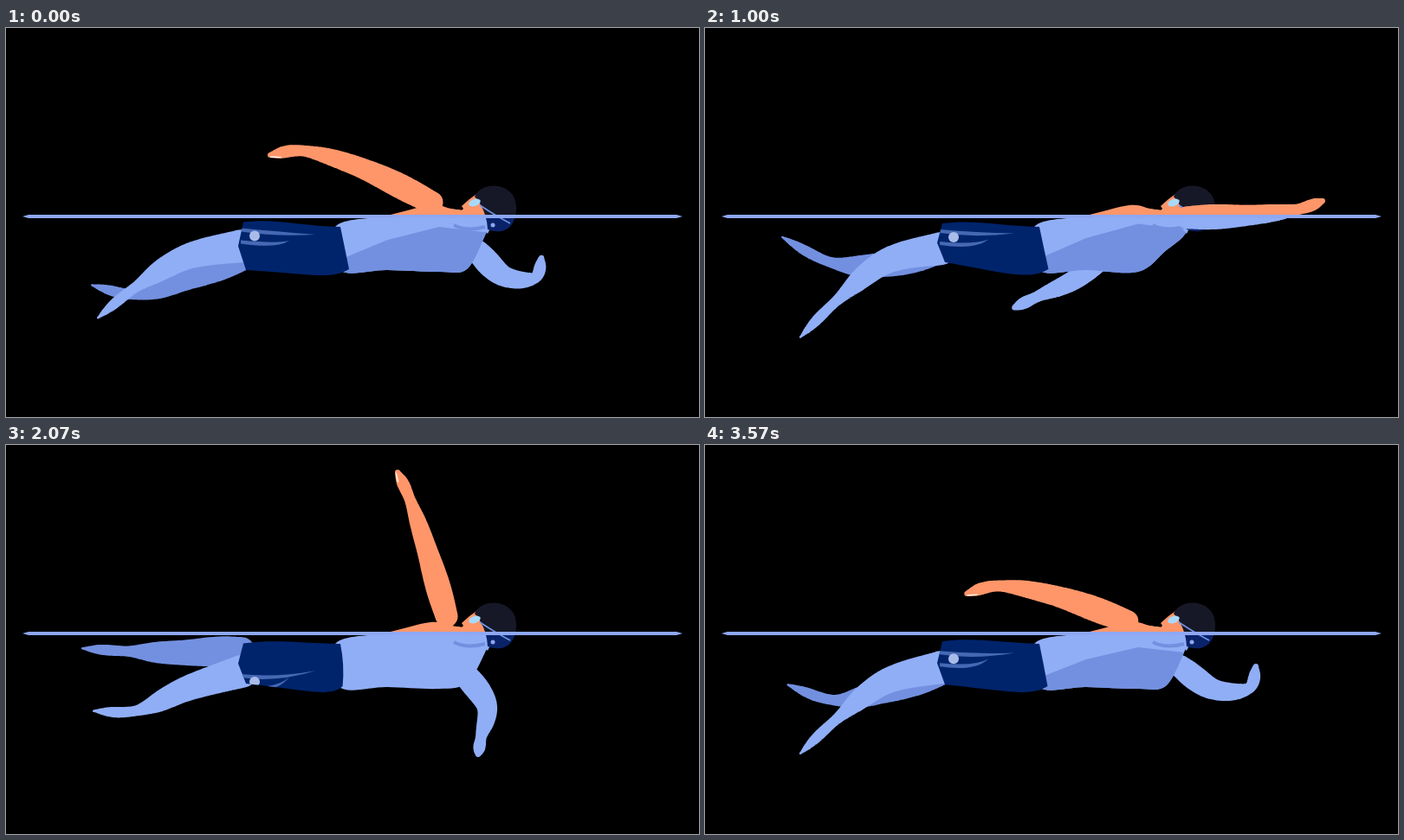
These frames come from a looping animation (800 px wide and 450 px high, 3.64 s). An HTML page with a canvas:

```html
<!DOCTYPE html>
<html lang="en">
<head>
<meta charset="utf-8">
<title>Swimmer</title>
<style>
  html, body { margin: 0; width: 100%; height: 100%; overflow: hidden; background: #000; }
  canvas { display: block; }
</style>
</head>
<body>
<canvas id="stage" width="800" height="450"></canvas>
<script>
const ctx = document.getElementById('stage').getContext('2d');
const LOOP = 3640, STEPS = 51, WATER = 217;

const AIR = { skin: '#ff966a', shade: '#f0764f', suit: '#061a55', cap: '#171827' };
const SEA = { skin: '#90aef6', shade: '#7390e0', suit: '#00246c', cap: '#0a2268' };

// Hand path of one stroke: step, x, y, elbow bend. The other arm is half a loop behind.
const STROKE = [
  [0, 305, 147, 15],
  [5, 530, 10, 0],
  [8, 645, 72, 3],
  [10, 697, 115, 5],
  [14, 713, 200, 6],
  [19, 716, 236, 5],
  [25, 627, 259, 27],
  [29, 545, 358, -20],
  [34, 398, 282, -50],
  [42, 342, 336, 3],
  [48, 300, 218, 12]
];
// Turning points of the toes: step, height.
const NEAR_KICK = [[5, 250], [12, 380], [21, 202], [31, 320], [39.5, 235], [47.5, 385]];
const FAR_KICK = [[3.5, 340], [11, 206], [20, 345], [32, 215], [39, 345], [46, 225]];

const ARM_RADII = [13, 14.5, 12, 10, 6.5, 7, 3];

const wave = (step, peak, beats = 1) => Math.cos(2 * Math.PI * beats * (step - peak) / STEPS);

// Smooth periodic interpolation that never overshoots a key.
function valuesAt(keys, time) {
  const n = keys.length, step = (time + STEPS) % STEPS;
  let i = n - 1;
  while (i >= 0 && keys[i][0] > step) i--;
  const key = k => keys[(k + n) % n];
  const when = k => key(k)[0] + Math.floor(k / n) * STEPS;
  const slope = (k, c) => (key(k + 1)[c] - key(k)[c]) / (when(k + 1) - when(k));
  const tangent = (k, c) => {
    const a = slope(k - 1, c), b = slope(k, c);
    return a * b <= 0 ? 0 : 2 * a * b / (a + b);
  };
  const h = when(i + 1) - when(i), u = (step - when(i)) / h;
  return key(i).slice(1).map((v, j) => {
    const c = j + 1, d = key(i + 1)[c] - v;
    return v + d * u * u * (3 - 2 * u)
      + h * u * (1 - u) * ((1 - u) * tangent(i, c) - u * tangent(i + 1, c));
  });
}

// Point at a fraction of a-b, pushed sideways.
function beside([ax, ay], [bx, by], fraction, push) {
  const dx = bx - ax, dy = by - ay, length = Math.hypot(dx, dy) || 1;
  return [ax + dx * fraction - dy / length * push, ay + dy * fraction + dx / length * push];
}

function armJoints(step) {
  const [x, y, bend] = valuesAt(STROKE, step);
  const shoulder = [518 + 44 * wave(step, 18), 230 - 32 * wave(step, 4)];
  const hand = [x, y];
  const elbow = beside(shoulder, hand, .44, bend);
  const wrist = beside(elbow, hand, .64, Math.max(0, bend) * .7);
  return [shoulder, elbow, wrist, hand];
}

// Knee and ankle run ahead of the toes, so the leg whips.
function legJoints(kick, step) {
  const swing = lead => valuesAt(kick, step + lead)[0] - 290;
  const knee = .4 * swing(2.5), ankle = .72 * swing(1.2), toe = swing(0);
  return [
    [272, 255 + .6 * knee],
    [208 + .1 * knee, 270 + knee],
    [149 + .14 * ankle, 287 + ankle],
    [98 + .18 * toe, 290 + toe]
  ];
}

function along(values, u) {
  const x = u * (values.length - 1), i = Math.min(Math.floor(x), values.length - 2), t = x - i;
  const p = k => values[Math.max(0, Math.min(values.length - 1, k))];
  const a = p(i - 1), b = p(i), c = p(i + 1), d = p(i + 2);
  return b + t * (c - a + t * (2 * a - 5 * b + 4 * c - d + t * (3 * (b - c) + d - a))) / 2;
}

function limb(joints, radii, color) {
  const xs = joints.map(p => p[0]), ys = joints.map(p => p[1]);
  ctx.fillStyle = color;
  ctx.beginPath();
  for (let i = 0; i <= 120; i++) {
    const u = i / 120, x = along(xs, u), y = along(ys, u), r = Math.max(1, along(radii, u));
    ctx.moveTo(x + r, y);
    ctx.arc(x, y, r, 0, 7);
  }
  ctx.fill();
}

const leg = (joints, hip, color) => limb(joints, [hip, 17, 14.5, 12, 6.3, 6, 1.2], color);

function smoothPath(points) {
  const n = points.length, p = k => points[(k + n) % n];
  ctx.beginPath();
  ctx.moveTo(...points[0]);
  for (let i = 0; i < n; i++) {
    const [a, b, c, d] = [p(i - 1), p(i), p(i + 1), p(i + 2)];
    ctx.bezierCurveTo(b[0] + (c[0] - a[0]) / 6, b[1] + (c[1] - a[1]) / 6,
      c[0] - (d[0] - b[0]) / 6, c[1] - (d[1] - b[1]) / 6, c[0], c[1]);
  }
}

function polygon(points, color) {
  ctx.fillStyle = color;
  ctx.beginPath();
  points.forEach(p => ctx.lineTo(...p));
  ctx.fill();
}

function dot(x, y, r, color) {
  ctx.fillStyle = color;
  ctx.beginPath();
  ctx.arc(x, y, r, 0, 7);
  ctx.fill();
}

function curve(color, width, x1, y1, cx, cy, x2, y2) {
  ctx.strokeStyle = color;
  ctx.lineWidth = width;
  ctx.beginPath();
  ctx.moveTo(x1, y1);
  ctx.quadraticCurveTo(cx, cy, x2, y2);
  ctx.stroke();
}

function drawTorso(step, roll, tone) {
  const armpit = 268 + 11 * wave(step, 0, 2);
  ctx.save();
  smoothPath([[380, 230], [440, 217], [490, 205], [514, 209], [532, 212], [558, 222],
    [553, 240], [532, armpit], [500, 282], [440, 280], [385, 280]]);
  ctx.fillStyle = tone.skin;
  ctx.fill();
  ctx.clip();
  const edge = 253 + 38 * roll;
  polygon([[380, 277 + 11 * roll], [440, 261 + 26 * roll], [500, edge], [570, edge + 8],
    [570, 330], [380, 330]], tone.shade);
  ctx.restore();
}

function drawSuit(roll, nearHip, lowHip, tone) {
  const top = 226 + (nearHip - 255) * .5, bottom = lowHip + 14;
  ctx.save();
  ctx.fillStyle = tone.suit;
  ctx.beginPath();
  ctx.moveTo(274, top);
  ctx.bezierCurveTo(310, top - 5, 340, 229, 386, 230);
  ctx.quadraticCurveTo(391, 254, 393 - 5 * roll, 279);
  ctx.bezierCurveTo(375, 292, 350, 284, 277, bottom);
  ctx.lineTo(268, (top + bottom) / 2);
  ctx.closePath();
  ctx.fill();
  ctx.clip();
  const x = 287, y = nearHip - 2 + 16 * roll, endY = 248 + 15 * roll;
  ctx.fillStyle = '#4769b4';
  for (const [shift, reach] of [[-7, 70], [7, 40]]) {
    ctx.beginPath();
    ctx.moveTo(x - 16, y + shift - 2);
    ctx.quadraticCurveTo(x + 25, y + shift + 2, x + reach, endY + Math.max(0, shift));
    ctx.quadraticCurveTo(x + 25, y + shift + 8, x - 16, y + shift + 2);
    ctx.fill();
  }
  dot(x, y, 6, '#a9bce9');
  ctx.restore();
}

function drawHead(tone) {
  polygon([[546, 190], [535, 198], [526, 206], [528, 209], [523, 214], [532, 223],
    [547, 228], [556, 238], [565, 220]], tone.skin);
  curve(tone.shade, 4, 517, 228, 532, 236, 553, 230);
  ctx.fillStyle = tone.cap;
  ctx.beginPath();
  ctx.moveTo(541, 195);
  ctx.bezierCurveTo(548, 179, 576, 178, 586, 195);
  ctx.bezierCurveTo(593, 209, 588, 232, 572, 235);
  ctx.quadraticCurveTo(563, 236, 556, 233);
  ctx.quadraticCurveTo(555, 211, 541, 195);
  ctx.fill();
  curve('#6f95e6', 1.6, 547, 205, 565, 217, 582, 226);
  ctx.fillStyle = '#a9d9f8';
  ctx.beginPath();
  ctx.ellipse(541, 202, 7, 4, -.35, 0, 7);
  ctx.fill();
  dot(562, 228, 2.5, '#8ca7ee');
}

function drawFingers([, , wrist, hand]) {
  if (hand[1] > WATER - 20) return;
  const [x, y] = beside(wrist, hand, .7, -4);
  curve('#fff', 1.4, x, y, x, y, ...beside(wrist, hand, 1, -2));
}

function drawWater() {
  polygon([[19, 218], [26, 216], [774, 216], [781, 218], [774, 220], [26, 220]], '#8ea7f3');
}

function draw(step) {
  const nearArm = armJoints(step), farArm = armJoints(step + STEPS / 2);
  const nearLeg = legJoints(NEAR_KICK, step), farLeg = legJoints(FAR_KICK, step);
  const nearHip = nearLeg[0][1], lowHip = Math.max(nearHip, farLeg[0][1]);
  const roll = wave(step, 33);
  const armCoversHead = step >= 6 && step <= 14;

  ctx.fillStyle = '#000';
  ctx.fillRect(0, 0, 800, 450);
  for (const [tone, y, height] of [[AIR, 0, WATER], [SEA, WATER, 450 - WATER]]) {
    ctx.save();
    ctx.beginPath();
    ctx.rect(0, y, 800, height);
    ctx.clip();
    limb(farArm, ARM_RADII, tone.skin);
    leg(farLeg, 15, tone.shade);
    drawTorso(step, roll, tone);
    leg(nearLeg, 19, tone.skin);
    drawSuit(roll, nearHip, lowHip, tone);
    if (armCoversHead) drawHead(tone);
    limb(nearArm, ARM_RADII, tone.skin);
    if (!armCoversHead) drawHead(tone);
    ctx.restore();
  }
  drawFingers(nearArm);
  drawFingers(farArm);
  drawWater();
}

function tick() {
  const t = performance.now() % LOOP;
  draw(Math.min(STEPS - 1, Math.floor((t + 5) * 14 / 1000)));
  requestAnimationFrame(tick);
}
tick();
</script>
</body>
</html>
```
